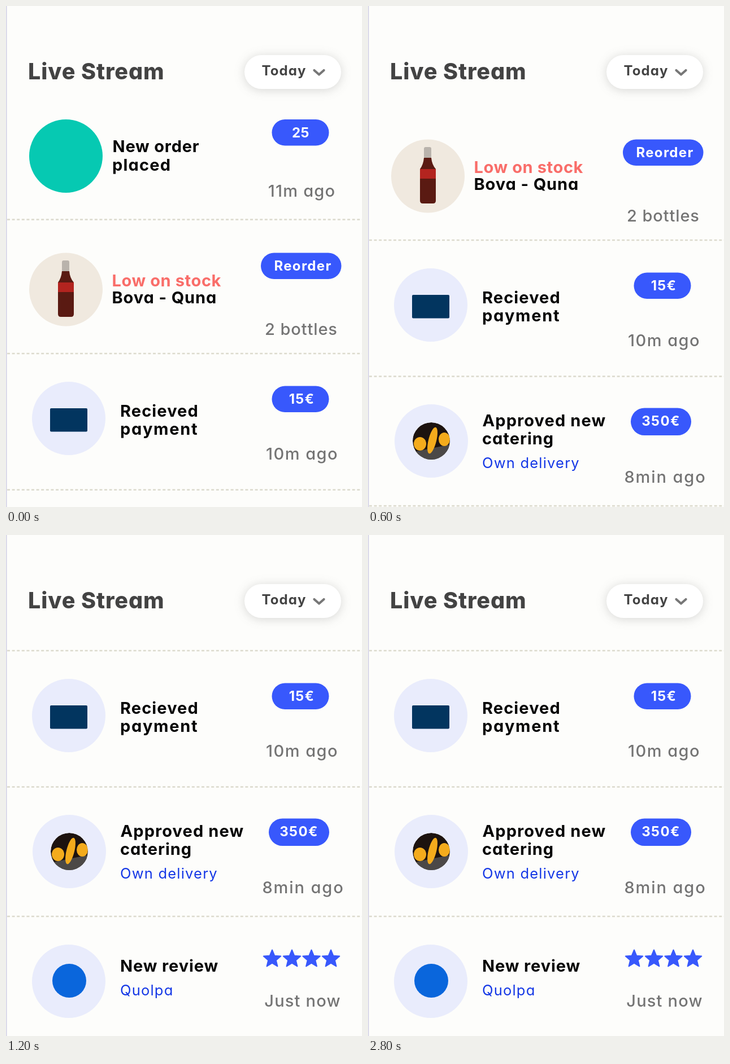
An HTML page that plays this animation: 630x888 px, repeating every 2900 ms.

```html
<!DOCTYPE html>
<html lang="en">
<head>
<meta charset="utf-8">
<title>Live Stream</title>
<style>
  html, body { margin: 0; width: 100%; height: 100%; overflow: hidden; background: #fdfdfb; }
  svg { display: block; width: 630px; height: 888px; }
  text { font-family: Inter, "Open Sans", sans-serif; font-feature-settings: "cv11"; white-space: pre; }
  .divider { stroke: #dcdacd; stroke-width: 2.4; stroke-dasharray: 5 3.6; }
  .button { fill: #fff; filter: drop-shadow(0 2px 9px rgba(60, 60, 60, .2)); }
</style>
</head>
<body>
<svg viewBox="0 0 630 888">
  <defs>
    <clipPath id="window"><rect y="201" width="630" height="687"/></clipPath>
    <clipPath id="photo"><circle cx="112" cy="972" r="33"/></clipPath>
  </defs>
  <g clip-path="url(#window)"><g id="list"></g></g>
  <g id="header"></g>
  <rect width="1.5" height="888" fill="#d2d0e6"/>
</svg>
<script>
const BLUE = '#3858fc', LILAC = '#e9ecfc';

const text = (x, y, label, size, weight, color, spacing, anchor = 'start') =>
  `<text x="${x}" y="${y}" font-size="${size}" font-weight="${weight}" fill="${color}"
    letter-spacing="${spacing}" text-anchor="${anchor}">${label}</text>`;
const title = (x, y, label, spacing, color = '#050505') => text(x, y, label, 29, 700, color, spacing);
const link = (y, label) => text(202, y, label, 25.5, 400, '#1437e6', 1.2);
const note = (x, y, label, spacing) => text(x, y, label, 29, 500, '#747474', spacing, 'middle');
const circle = (x, y, r, color) => `<circle cx="${x}" cy="${y}" r="${r}" fill="${color}"/>`;
const rect = (x, y, w, h, color, r = 0) =>
  `<rect x="${x}" y="${y}" width="${w}" height="${h}" rx="${r}" fill="${color}"/>`;
const divider = y => `<path class="divider" d="M2 ${y}H630"/>`;
const pill = (x, y, w, h, label, center, spacing) =>
  rect(x, y, w, h, BLUE, h / 2) + text(center, y + 31.5, label, 24, 700, '#fff', spacing, 'middle');

function star(cx, cy) {
  const points = Array.from({ length: 10 }, (_, i) => {
    const r = i % 2 ? 7.2 : 16, a = i * Math.PI / 5;
    return `${cx + r * Math.sin(a)},${cy - r * Math.cos(a)}`;
  });
  return `<polygon points="${points.join(' ')}" fill="${BLUE}" stroke="${BLUE}" stroke-width="2" stroke-linejoin="round"/>`;
}

const bottle = rect(99, 451, 13, 20, '#b9b3ac', 3) +
  `<path d="M99 470H112Q113 482 120 490V546Q120 551 115 551H97Q92 551 92 546V490Q98 482 99 470Z" fill="#5a1a12"/>` +
  rect(92, 490, 28, 17, '#b3241f');

const signPhoto = `<g clip-path="url(#photo)">
  ${circle(112, 972, 33, '#1d130f')}
  <path d="M78 992L146 978V1006H78Z" fill="#4b4847"/>
  <g fill="#f4ab1c">
    <ellipse cx="92" cy="977" rx="11" ry="12"/>
    <ellipse cx="114" cy="971" rx="7" ry="24" transform="rotate(14 114 971)"/>
    <ellipse cx="135" cy="969" rx="10" ry="12"/>
  </g></g>`;

document.getElementById('header').innerHTML =
  text(39, 130, 'Live Stream', 39.5, 800, '#434343', .9) +
  '<rect class="button" x="422" y="87" width="171" height="60" rx="30"/>' +
  text(452.5, 123, 'Today', 24, 700, '#434343', 1.1) +
  '<path d="M545.5 114L554 121.5L562.5 114" fill="none" stroke="#777" stroke-width="4.2" stroke-linecap="round" stroke-linejoin="round"/>';

const list = document.getElementById('list');
list.innerHTML = [
  circle(106, 266, 65, '#06c9b2'),
  title(188.5, 259, 'New order', .8), title(188, 292, 'placed', 1.2),
  pill(470.5, 201, 101, 46.5, '25', 521.5, .5), note(523.5, 338, '11m ago', 1.2), divider(378.5),

  circle(106, 502.5, 65, '#f0e9df'), bottle,
  title(187.5, 497, 'Low on stock', .6, '#f96d69'), title(187.5, 527, 'Bova - Quna', .9),
  pill(451, 437.5, 142.5, 46.5, 'Reorder', 525.5, 1.3), note(522.5, 583, '2 bottles', .9), divider(616),

  circle(111, 731, 65, LILAC), rect(78, 713, 66, 41.5, '#02355f', 2),
  title(202, 728, 'Recieved', 1.1), title(202, 760, 'payment', 1.7),
  pill(470.5, 673.5, 101, 46.5, '15€', 523.5, 1.3), note(524, 804, '10m ago', 1.5), divider(857.5),

  circle(112, 972, 65, LILAC), signPhoto,
  title(202.5, 946, 'Approved new', 1.1), title(202, 978, 'catering', 1), link(1020, 'Own delivery'),
  pill(465, 913.5, 107, 48.5, '350€', 518.5, 1.4), note(526, 1046, '8min ago', 1.9), divider(1087),

  circle(111, 1202, 65, LILAC), circle(112, 1201, 30, '#0a66dc'),
  title(202, 1185, 'New review', .9), link(1227, 'Quolpa'),
  ...[471, 506, 540.5, 575].map(x => star(x, 1162.5)), note(525, 1247, 'Just now', 1.2),
].join('');

// The list jumps into motion at 500 ms and slows to a stop, ten steps a second.
function scrollAt(ms) {
  if (ms < 500) return 0;
  const p = Math.min(1, (ms - 345) / 670);
  return Math.round(411 * (1 - (1 - p) ** 1.4));
}

function draw() {
  const step = Math.floor(performance.now() % 2900 / 100) * 100;
  list.setAttribute('transform', `translate(0 ${-scrollAt(step)})`);
  requestAnimationFrame(draw);
}
draw();
</script>
</body>
</html>
```
